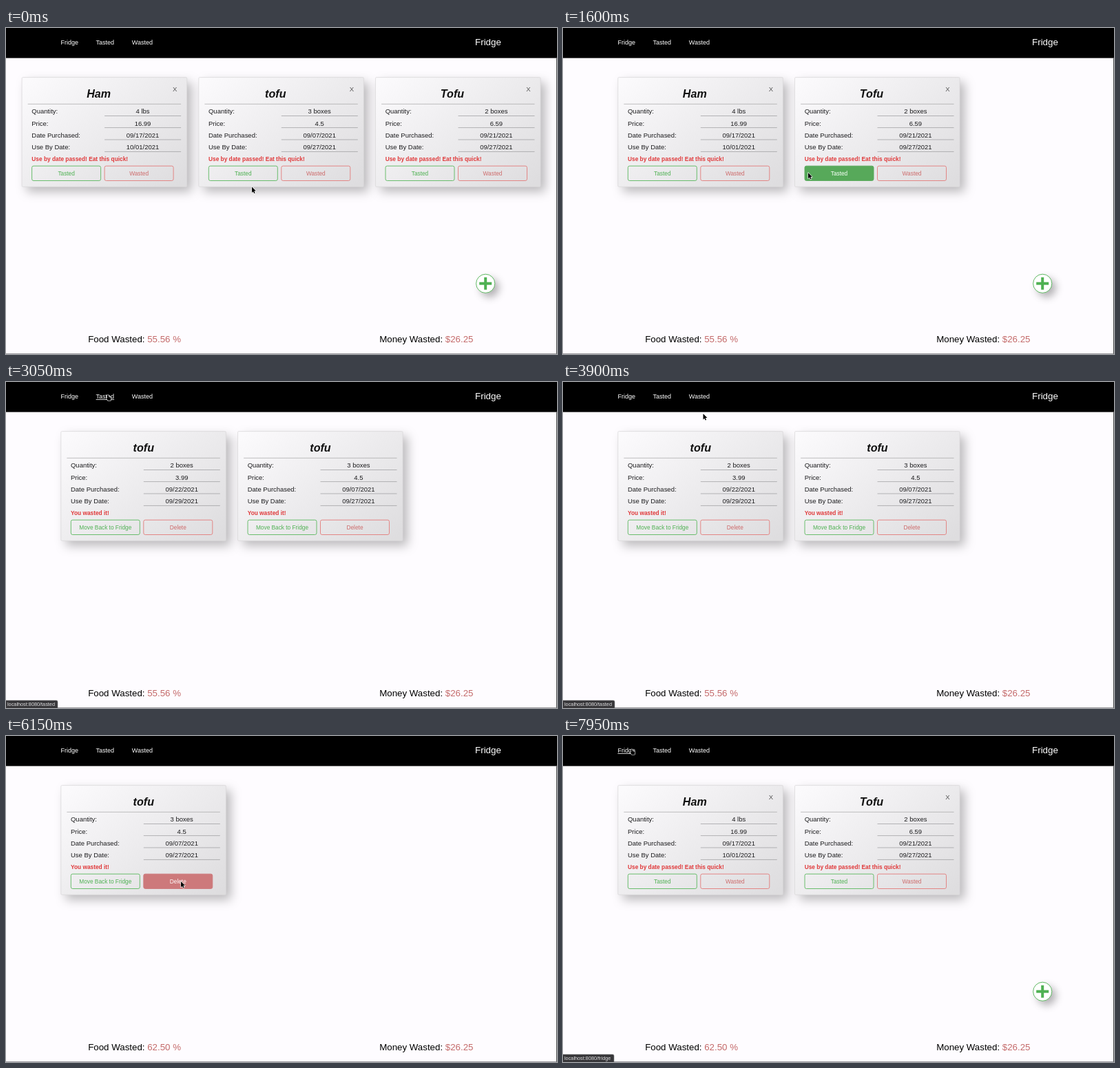
Write an HTML page with a canvas that moves like this. It is 800 px wide and 473 px high and loops after 8000 ms.

```html
<!DOCTYPE html>
<html lang="en">
<head>
<meta charset="utf-8">
<title>Fridge</title>
<style>
  html, body { margin: 0; width: 100%; height: 100%; overflow: hidden; background: #fefcff; }
  canvas { display: block; width: 800px; height: 473px; }
</style>
</head>
<body>
<canvas id="stage"></canvas>
<script>
const W = 800, H = 473, LOOP = 8000;
const SANS = '"Liberation Sans", Arial, sans-serif';
const GREEN = '#4fb153', RED = '#cd6b6b';
const canvas = document.getElementById('stage');
const ctx = canvas.getContext('2d');
const dpr = window.devicePixelRatio || 1;
canvas.width = W * dpr;
canvas.height = H * dpr;

const HAM = ['Ham', '4 lbs', '16.99', '09/17/2021', '10/01/2021'];
const TOFU_A = ['tofu', '3 boxes', '4.5', '09/07/2021', '09/27/2021'];
const TOFU_B = ['Tofu', '2 boxes', '6.59', '09/21/2021', '09/27/2021'];
const TOFU_C = ['tofu', '2 boxes', '3.99', '09/22/2021', '09/29/2021'];
const LABELS = ['Quantity:', 'Price:', 'Date Purchased:', 'Use By Date:'];

const fridgePage = cards => ({
  cards, fridge: true,
  note: 'Use by date passed! Eat this quick!',
  actions: ['Tasted', 'Wasted']
});
const tastedPage = cards => ({
  cards, fridge: false,
  note: 'You wasted it!',
  actions: ['Move Back to Fridge', 'Delete']
});

// [start time, page]
const PAGES = [
  [0, fridgePage([HAM, TOFU_A, TOFU_B])],
  [1350, fridgePage([HAM, TOFU_B])],
  [2950, tastedPage([TOFU_C, TOFU_A])],
  [6050, tastedPage([TOFU_A])],
  [7750, fridgePage([HAM, TOFU_B])]
];

// [time, x, y] of the pointer tip
const PATH = [
  [0, 357, 230.5], [450, 357, 230.5], [750, 356, 210], [1700, 356, 210],
  [2200, 233, 41.5], [2480, 165, 10], [2700, 148, 18], [3500, 148, 20],
  [3900, 203.5, 46], [4250, 222, 106], [5120, 269, 206.5], [5300, 269, 206.5],
  [5700, 254, 211], [6250, 254, 211], [6800, 134, 64], [7250, 100, 19], [8000, 100, 19]
];

// Button hovers: card slot, button index, enter and leave times
const HOVERS = [
  { slot: 1, button: 0, on: 580, off: 1790 },
  { slot: 0, button: 1, on: 5030, off: 6370 }
];
const NAV = [
  { text: 'Fridge', x: 79.4, on: 7150, off: 8000 },
  { text: 'Tasted', x: 130.6, on: 2600, off: 3650 },
  { text: 'Wasted', x: 182.8 }
];
const STATUS = [
  { text: 'localhost:8080/tasted', w: 75, on: 2680, off: 4200 },
  { text: 'localhost:8080/fridge', w: 74, on: 7700, off: 8200 }
];

const clamp = v => Math.max(0, Math.min(1, v));
const smooth = v => v * v * (3 - 2 * v);

function text(str, x, y, size, color, align = 'left', style = '') {
  ctx.font = `${style} ${size}px ${SANS}`;
  ctx.textAlign = align;
  ctx.fillStyle = color;
  ctx.fillText(str, x, y);
  return ctx.measureText(str).width;
}

function line(x1, x2, y, color, width = 0.6) {
  ctx.fillStyle = color;
  ctx.fillRect(x1, y - width / 2, x2 - x1, width);
}

function box(x, y, w, h, r) {
  ctx.beginPath();
  ctx.roundRect(x, y, w, h, r);
}

function shadow(color, offset, blur) {
  ctx.shadowColor = color;
  ctx.shadowOffsetX = ctx.shadowOffsetY = offset * dpr;
  ctx.shadowBlur = blur * dpr;
}

function hoverLevel(slot, button, t) {
  const h = HOVERS.find(v => v.slot === slot && v.button === button);
  return h ? smooth(clamp((t - h.on) / 200)) * (1 - smooth(clamp((t - h.off) / 200))) : 0;
}

function drawButton(label, x, y, color, border, fill, level) {
  box(x, y, 100, 21.3, 2.4);
  ctx.globalAlpha = level;
  ctx.fillStyle = fill;
  ctx.fill();
  ctx.globalAlpha = 1;
  ctx.strokeStyle = level > 0.9 ? fill : border;
  ctx.lineWidth = 0.9;
  ctx.stroke();
  text(label, x + 50, y + 13.7, 8.3, color, 'center');
  ctx.globalAlpha = level;
  text(label, x + 50, y + 13.7, 8.3, '#fff', 'center');
  ctx.globalAlpha = 1;
}

function drawCard(page, card, slot, x, t) {
  const [name, ...values] = card;
  const y = 71.6, w = 239.6, h = 158.8;
  const paint = ctx.createLinearGradient(x + 40, y - 20, x + 200, y + 180);
  paint.addColorStop(0, '#fbfafc');
  paint.addColorStop(1, '#dedddf');
  ctx.save();
  shadow('rgba(0,0,0,.27)', 7, 15);
  box(x, y, w, h, 1.5);
  ctx.fillStyle = paint;
  ctx.fill();
  ctx.restore();
  ctx.strokeStyle = '#d8d7d9';
  ctx.lineWidth = 0.7;
  ctx.stroke();

  text(name, x + (page.fridge ? 111.5 : 120), 100.5, 16.1, '#111', 'center', 'italic bold');
  if (page.fridge) text('X', x + 222, 91.5, 9.5, '#555', 'center');
  line(x + 8.6, x + 231, 110.2, '#999');
  LABELS.forEach((label, i) => {
    const base = 124.4 + i * 17.25;
    text(label, x + 14.2, base, 9.47, '#1c1c1e');
    text(values[i], x + 175.4, base, 9.47, '#1c1c1e', 'center');
    line(x + 120, x + 231, base + 3.1, '#8d8d8f');
  });
  text(page.note, x + 14.2, 192.8, 8.33, '#e0393a', 'left', 'bold');
  const [a, b] = page.actions;
  drawButton(a, x + 14.5, 200.2, GREEN, '#5cb85f', '#57a95a', hoverLevel(slot, 0, t));
  drawButton(b, x + 120, 200.2, RED, '#e27c7b', '#cd797b', hoverLevel(slot, 1, t));
}

function drawAddButton() {
  ctx.save();
  shadow('rgba(0,0,0,.3)', 6, 12);
  ctx.beginPath();
  ctx.arc(696.2, 370.8, 13.6, 0, Math.PI * 2);
  ctx.fillStyle = '#fff';
  ctx.fill();
  ctx.restore();
  ctx.strokeStyle = GREEN;
  ctx.lineWidth = 0.9;
  ctx.stroke();
  ctx.fillStyle = GREEN;
  ctx.fillRect(687.2, 368.7, 18, 4);
  ctx.fillRect(694.2, 361.7, 4, 18);
}

function drawNav(t) {
  ctx.fillStyle = '#000';
  ctx.fillRect(0, 0, W, 43.6);
  NAV.forEach(n => {
    const width = text(n.text, n.x, 23.9, 9, '#fff');
    if (t >= n.on && t < n.off) line(n.x, n.x + width, 25.5, '#fff', 0.8);
  });
  text('Fridge', 681, 25.4, 13.4, '#fff');
}

function drawFooter(t) {
  const stat = (label, value, x) => {
    const w = text(label, x, 455.8, 13.3, '#000');
    text(value, x + w, 455.8, 13.3, '#c46a6a');
  };
  stat('Food Wasted: ', t < 6050 ? '55.56 %' : '62.50 %', 119.2);
  stat('Money Wasted: ', '$26.25', 542.2);
}

function drawEdges() {
  ctx.fillStyle = '#4a4a4c';
  ctx.fillRect(799, 43.6, 1, H);
  ctx.fillStyle = '#77767a';
  ctx.fillRect(0, 472.3, W, 0.7);
}

function drawStatus(t) {
  STATUS.forEach(s => {
    const level = clamp((t - s.on) / 100) * (1 - clamp((t - s.off) / 200));
    if (!level) return;
    ctx.globalAlpha = level;
    box(-3, 462, s.w + 3, 14, 2);
    ctx.fillStyle = '#38373a';
    ctx.fill();
    ctx.strokeStyle = '#77777a';
    ctx.lineWidth = 0.6;
    ctx.stroke();
    text(s.text, 2, 470.2, 7.3, '#dedee0');
    ctx.globalAlpha = 1;
  });
}

function pointerAt(t) {
  const i = Math.max(1, PATH.findIndex(p => p[0] > t));
  const [t0, x0, y0] = PATH[i - 1], [t1, x1, y1] = PATH[i];
  const k = smooth((t - t0) / (t1 - t0));
  return [x0 + (x1 - x0) * k, y0 + (y1 - y0) * k];
}

const ARROW = new Path2D('M0 0V8.4L1.9 6.7L3.2 9.6L4.6 9L3.3 6.1H5.9Z');
const HAND = new Path2D('M-1 .7Q0-.6 .8.7L1.2 3Q2 2.5 2.5 3.2Q3.2 2.8 3.6 3.6Q4.6 3.4 4.6 4.7L4 8H-.2L-2.4 5Q-2.4 3.8-1.2 4.5Z');

function drawPointer(t) {
  const hand = NAV.some(n => t >= n.on && t < n.off);
  ctx.save();
  ctx.translate(...pointerAt(t));
  ctx.lineJoin = 'round';
  ctx.strokeStyle = '#fff';
  ctx.lineWidth = 1.2;
  ctx.fillStyle = '#000';
  const shape = hand ? HAND : ARROW;
  ctx.stroke(shape);
  ctx.fill(shape);
  ctx.restore();
}

function draw(t) {
  ctx.setTransform(dpr, 0, 0, dpr, 0, 0);
  ctx.fillStyle = '#fefcff';
  ctx.fillRect(0, 0, W, H);
  const page = PAGES.filter(p => p[0] <= t).pop()[1];
  const left = page.cards.length === 3 ? 23.1 : 79.8;
  page.cards.forEach((card, i) => drawCard(page, card, i, left + i * 256.7, t));
  if (page.fridge) drawAddButton();
  drawNav(t);
  drawFooter(t);
  drawEdges();
  drawStatus(t);
  drawPointer(t);
}

const start = performance.now();
function tick() {
  draw((performance.now() - start) % LOOP);
  requestAnimationFrame(tick);
}
tick();
</script>
</body>
</html>
```
